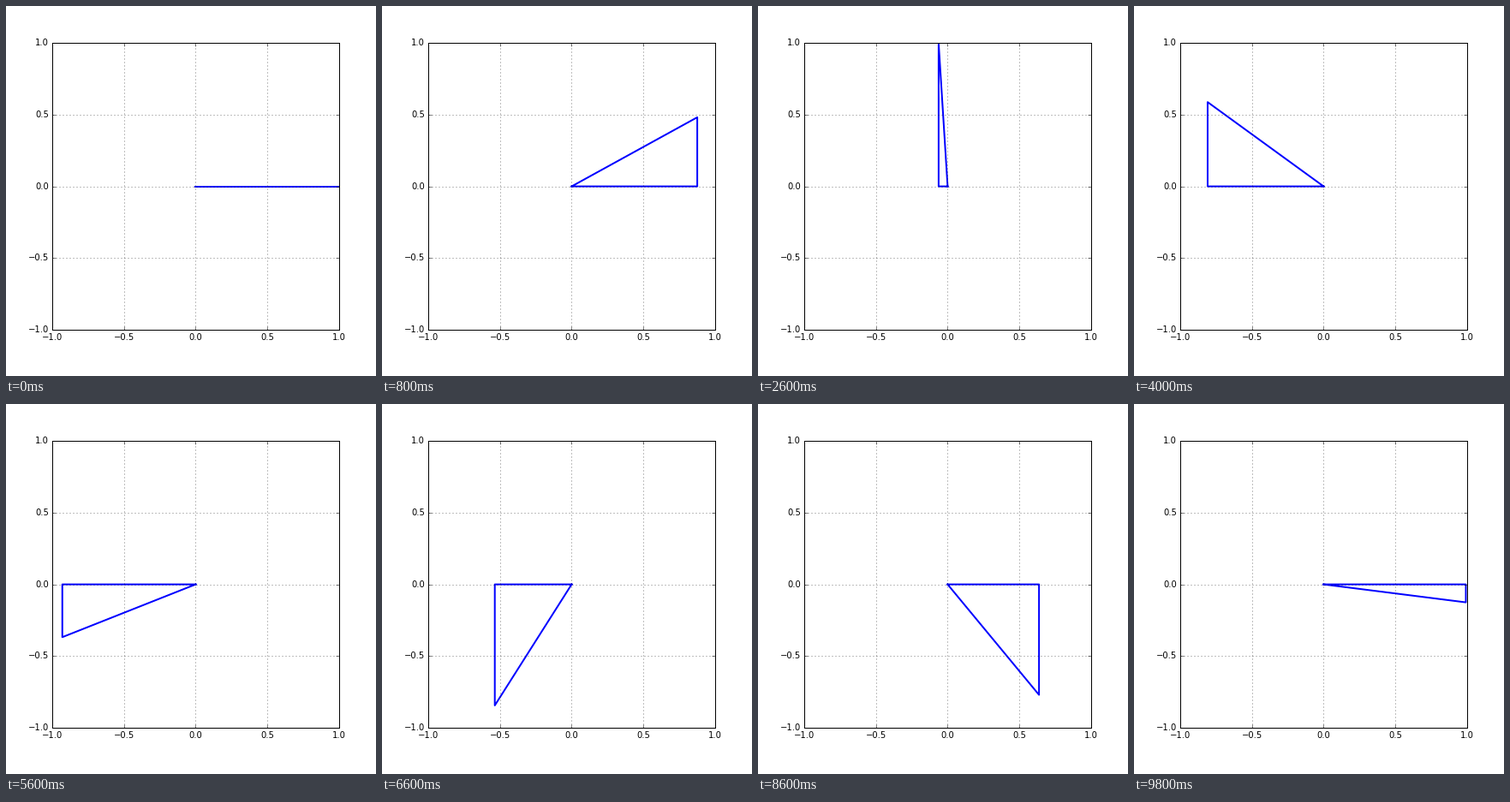
These frames come from a looping animation (432 px wide and 432 px high, 10 s). A matplotlib script:

```python
import numpy as np
import matplotlib.pyplot as plt
from matplotlib.animation import FuncAnimation

FRAMES = 50
INTERVAL = 200

plt.style.use("classic")
plt.rcParams.update({
    "figure.dpi": 72,
    "savefig.dpi": "figure",
    "figure.facecolor": "white",
    "savefig.facecolor": "white",
    "font.family": "DejaVu Sans",
    "font.size": 10,
    "xtick.labelsize": 10,
    "ytick.labelsize": 10,
})

fig = plt.figure(figsize=(6, 6), dpi=72)
ax = fig.add_axes([0.125, 0.125, 0.775, 0.775])
ticks = np.linspace(-1, 1, 5)
ax.set(xlim=(-1, 1), ylim=(-1, 1), xticks=ticks, yticks=ticks)
ax.grid(True)

triangle, = ax.plot([], [], color="blue", lw=2)


def update(i):
    angle = 2 * np.pi * i / FRAMES
    x, y = np.cos(angle), np.sin(angle)
    triangle.set_data([0, x, x, 0], [0, 0, y, 0])
    return triangle,


def init():
    return update(0)


anim = FuncAnimation(fig, update, frames=FRAMES, init_func=init,
                     interval=INTERVAL, repeat=True, repeat_delay=0)
plt.show()
```
